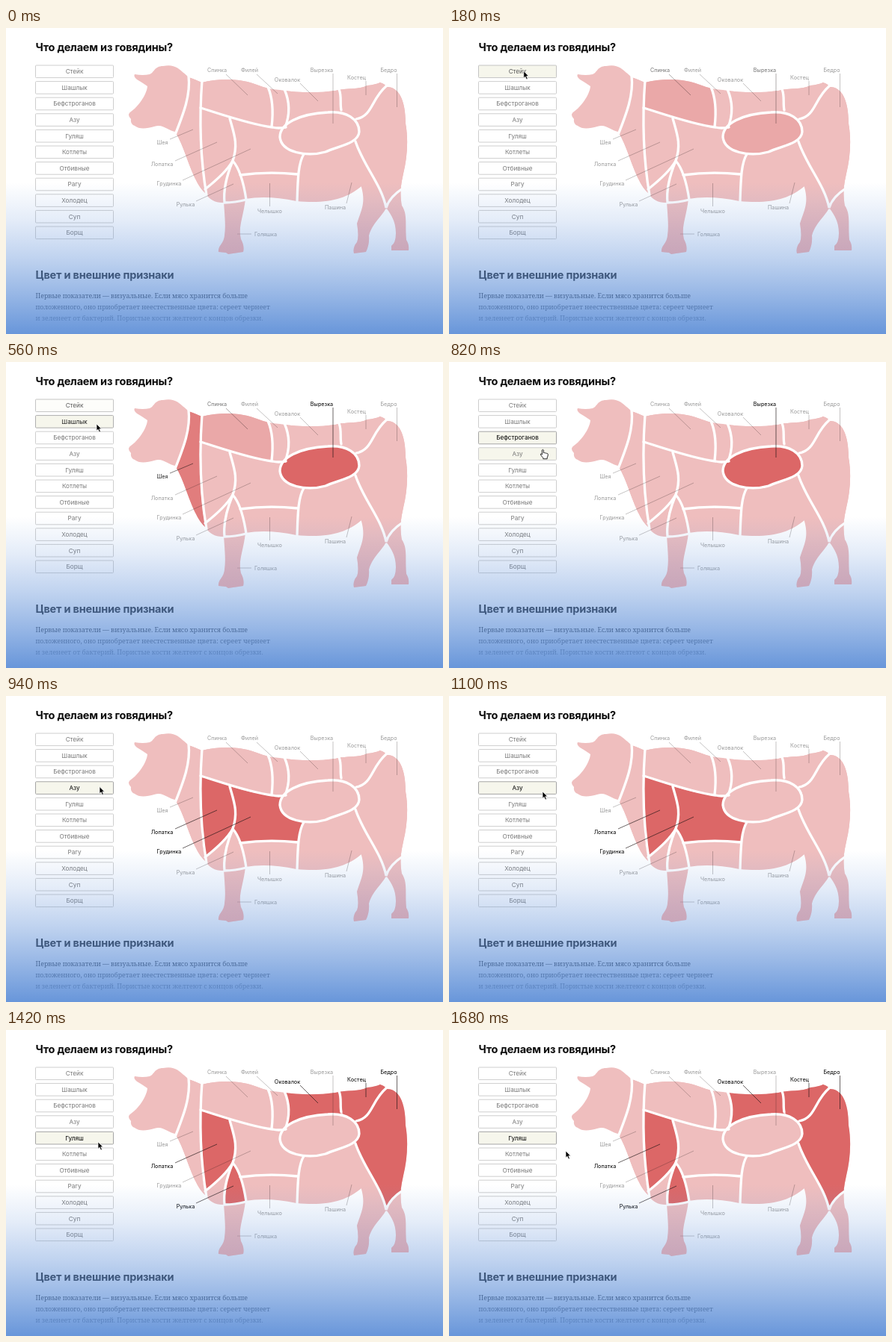
An HTML page that plays this animation: 584 px wide and 410 px high, repeating every 1.7 s.

```html
<!DOCTYPE html>
<html lang="ru">
<head>
<meta charset="utf-8">
<title>Что делаем из говядины?</title>
<style>
html, body { margin: 0; width: 100%; height: 100%; overflow: hidden; background: #fff; }
svg { display: block; width: 584px; height: 410px; }
text { font-family: Inter, "Open Sans", sans-serif; }
.head { font-size: 14.5px; font-weight: 700; letter-spacing: -.2px; fill: #0c0c0c; }
.body { font: 8.77px "Noto Serif", serif; fill: #000; }
.dish text { font-size: 8.2px; text-anchor: middle; }
.label { font-size: 7.25px; text-anchor: middle; }
.seams { fill: none; stroke: #fff; stroke-width: 3.3; stroke-linecap: round; }
</style>
</head>
<body>
<svg viewBox="0 0 584 410">
  <defs>
    <clipPath id="cow">
      <path d="M244,66 Q253,69 262,73 C285,67 315,67 338,77 Q350,82 366,83 Q405,89 440,84 C455,80 472,83 483,77 Q493,76 500,73 Q507,75 508,79 C524,78 534,95 534,128 C538,150 536,175 531,195 Q528,208 527,220 L508,243 Q492,225 475,212 C455,229 430,236 388,232 Q350,224 320,229 L291,234 Q275,235 266,221 C247,203 241,162 226,139 C215,137 210,128 198,132 C188,135 178,136 172,131 Q166,129 167,122 Q161,116 167,112 C176,106 188,90 189,78 Q182,73 175,69 Q170,65 172,62 Q183,64 192,62 C198,60 198,51 210,51 C228,47 234,58 244,66Z"/>
      <path d="M474,210 C482,235 474,245 469,262 Q472,280 469,287 Q463,294 465,302 L481,300 Q486,290 485,278 C489,262 503,252 508,241 C515,250 521,260 521,275 Q521,288 515,292 L515,298 L538,298 Q539,290 535,284 C533,262 537,250 529,238 Q527,228 528,214Z"/>
      <path d="M291,232 C292,250 294,265 292,278 C291,290 283,291 284,300 L294,301 L297,303 L317,300 Q319,292 314,283 C310,265 317,255 320,229Z"/>
    </clipPath>
    <linearGradient id="haze" x2="0" y2="1">
      <stop stop-color="#6896da" stop-opacity="0"/>
      <stop offset=".25" stop-color="#6896da" stop-opacity=".18"/>
      <stop offset=".5" stop-color="#6896da" stop-opacity=".42"/>
      <stop offset=".75" stop-color="#6896da" stop-opacity=".7"/>
      <stop offset="1" stop-color="#6896da"/>
    </linearGradient>
    <linearGradient id="blush" x2="0" y2="1">
      <stop stop-color="#dc9ca6" stop-opacity="0"/>
      <stop offset="1" stop-color="#dc9ca6" stop-opacity=".45"/>
    </linearGradient>
  </defs>

  <text class="head" x="39.5" y="31">Что делаем из говядины?</text>
  <g id="menu"></g>

  <g clip-path="url(#cow)">
    <path fill="#efbebe" d="M150,40H560V310H150Z"/>
    <g id="cuts"></g>
  </g>
  <g class="seams">
    <path d="M244,64 C247,90 237,115 226,143"/>
    <path d="M262,70 C259,110 258,165 268,224"/>
    <path d="M260,107 C280,113 328,130 356,133 Q364,135 374,133"/>
    <path d="M350,79 C357,95 357,115 355,132"/>
    <path d="M372,82 C379,98 380,115 373,133"/>
    <path d="M445,82 C449,92 446,100 448,110"/>
    <path d="M508,78 C488,95 490,118 468,122"/>
    <path d="M467,152 C478,185 502,210 508,241 Q512,227 530,215"/>
    <path d="M398,169 C390,182 390,205 389,233"/>
    <path d="M390,196 Q350,192 313,197"/>
    <path d="M299,121 C304,140 311,155 303,178 C295,192 280,205 266,216"/>
    <path d="M303,178 C296,195 290,215 292,234 Q306,234 321,230 C318,210 312,188 303,178"/>
    <path d="M366,146 C366,128 392,115 430,113 C455,111 472,122 472,139 C471,155 444,158 427,166 C402,173 368,167 366,146Z"/>
  </g>
  <g id="labels"></g>

  <text class="head" x="39.5" y="336">Цвет и внешние признаки</text>
  <text class="body" x="39.5" y="361.5">Первые показатели — визуальные. Если мясо хранится больше</text>
  <text class="body" x="39.5" y="376.5">положенного, оно приобретает неестественные цвета: сереет чернеет</text>
  <text class="body" x="39.5" y="391.5">и зеленеет от бактерий. Пористые кости желтеют с концов обрезки.</text>
  <rect y="207" width="584" height="203" fill="url(#haze)"/>
  <g clip-path="url(#cow)"><rect x="270" y="232" width="275" height="72" fill="url(#blush)"/></g>

  <g id="cursor" stroke="#fff" stroke-width=".7" stroke-linejoin="round">
    <path id="arrow" d="M0,0V9.2L2.1,7.3L3.7,11L5.4,10.3L3.8,6.7H6.6Z"/>
    <path id="hand" fill="#fff" stroke="#111" stroke-width=".9" d="M0,.8Q1,-.5 2,.8V4.6Q3,3.8 4,4.9Q5.2,4.3 6,5.3Q7.6,4.9 7.9,6.4Q8.1,9 6.8,10.8V12.6H1.4V11.2Q-.8,9 -2,7Q-2.3,5.5 -.9,6L0,7Z"/>
  </g>
</svg>
<script>
const LOOP = 1700, STEP = 20, FADE = 80, PITCH = 21.6;

const dishes = ['Стейк', 'Шашлык', 'Бефстроганов', 'Азу', 'Гуляш', 'Котлеты',
  'Отбивные', 'Рагу', 'Холодец', 'Суп', 'Борщ'];

// name, label centre, baseline, pointer line
const labels = [
  ['Спинка', 282, 58.5, 'M294,62L323,90'],
  ['Филей', 325.5, 58.5, 'M335,62L363,88'],
  ['Оковалок', 376, 71.5, 'M393,74L417,98'],
  ['Вырезка', 422, 58.5, 'M437,61V128'],
  ['Костец', 468.5, 68.5, 'M481,71V90'],
  ['Бедро', 511.5, 58.5, 'M522.5,61V106'],
  ['Шея', 209, 156, 'M219,149L250,136'],
  ['Лопатка', 208.5, 184.5, 'M226,178L282,153'],
  ['Грудинка', 218, 210.5, 'M236,204L327,162'],
  ['Рулька', 240, 238.5, 'M254,232L304,209'],
  ['Челышко', 352.5, 248, 'M352.5,208V239'],
  ['Пашина', 440, 243, 'M455,235L462,207'],
  ['Голяшка', 347, 279, 'M309,276H328']
];

const cuts = {
  'Шея': 'M244,60 C247,90 237,115 226,143 L240,215 L268,224 C258,165 259,110 262,66Z',
  'Спинка': 'M262,70 Q260,92 260,107 C280,113 328,130 356,133 C357,115 357,95 350,76 L300,60Z',
  'Оковалок': 'M372,78 C379,98 380,115 373,133 L400,125 L448,120 V108 C446,100 449,92 445,78Z',
  'Костец': 'M445,78 C449,92 446,100 448,108 L455,122 H468 C490,118 488,95 508,78 L500,65Z',
  'Бедро': 'M508,78 C488,95 490,118 468,122 L460,140 L467,152 C478,185 502,210 508,241 Q512,227 530,215 L550,140 L530,75Z',
  'Лопатка': 'M260,107 Q282,113 299,121 C304,140 311,155 303,178 C295,192 280,205 266,216 C260,190 259,150 260,107Z',
  'Грудинка': 'M299,121 Q330,131 356,133 L374,133 L380,150 L398,169 Q391,182 390,196 Q350,192 313,197 Q308,185 303,178 C311,155 304,140 299,121Z',
  'Рулька': 'M303,178 C296,195 290,215 292,234 Q306,234 321,230 C318,210 312,188 303,178Z',
  'Вырезка': 'M366,146 C366,128 392,115 430,113 C455,111 472,122 472,139 C471,155 444,158 427,166 C402,173 368,167 366,146Z'
};

// click time, dish index, cuts it lights up
const clicks = [
  [0, -1, []],
  [160, 0, ['Спинка', 'Вырезка']],
  [500, 1, ['Шея', 'Вырезка']],
  [700, 2, ['Вырезка']],
  [840, 3, ['Лопатка', 'Грудинка']],
  [1320, 4, ['Оковалок', 'Костец', 'Бедро', 'Лопатка', 'Рулька']]
];

// time, x, y of the pointer tip
const route = [[20, 14, 14], [150, 99, 57], [340, 111, 69.5], [460, 119, 79], [560, 121, 83],
  [690, 122, 101], [840, 124.5, 118], [940, 125, 121.5], [1100, 125, 128],
  [1280, 123, 151], [1420, 123, 150], [1680, 156, 162]];

const $ = id => document.getElementById(id);

function add(parent, tag, attrs, text = '') {
  const el = document.createElementNS('http://www.w3.org/2000/svg', tag);
  for (const key in attrs) el.setAttribute(key, attrs[key]);
  el.textContent = text;
  return parent.appendChild(el);
}

const mix = (a, b, k) => `rgb(${a.map((v, i) => Math.round(v + (b[i] - v) * k))})`;
const gray = (a, b, k) => mix([a, a, a], [b, b, b], k);

const buttons = dishes.map((name, i) => {
  const g = add($('menu'), 'g', { class: 'dish', transform: `translate(39.5 ${50 + i * PITCH})` });
  return {
    box: add(g, 'rect', { width: 104, height: 16.6, rx: 1 }),
    text: add(g, 'text', { x: 52, y: 11.3 }, name)
  };
});

const marks = labels.map(([name, x, y, d]) => ({
  name,
  line: add($('labels'), 'path', { d, 'stroke-width': .8 }),
  text: add($('labels'), 'text', { class: 'label', x, y }, name)
}));

const shapes = Object.entries(cuts).map(([name, d]) => ({ name, el: add($('cuts'), 'path', { d }) }));

function pointer(t) {
  const i = Math.max(1, route.findIndex(p => p[0] >= t));
  const [t0, x0, y0] = route[i - 1], [t1, x1, y1] = route[i];
  const u = Math.max(0, (t - t0) / (t1 - t0)), k = u * u * (3 - 2 * u);
  return [x0 + (x1 - x0) * k, y0 + (y1 - y0) * k];
}

function rowAt(x, y) {
  const row = Math.floor((y - 50) / PITCH);
  return x > 39 && x < 144 && y - 50 - row * PITCH < 17 ? row : -1;
}

function draw(t) {
  const n = clicks.filter(c => c[0] <= t).length - 1;
  const now = clicks[n], before = clicks[Math.max(0, n - 1)];
  const k = Math.min(1, (t - now[0]) / FADE);
  const blend = test => test(before) * (1 - k) + test(now) * k;
  const lit = name => blend(c => c[2].includes(name));

  const [x, y] = pointer(t);
  const over = t < STEP ? -1 : rowAt(x, y);

  buttons.forEach(({ box, text }, i) => {
    const on = blend(c => c[1] === i);
    box.setAttribute('fill', mix([255, 255, 255], [246, 246, 236], i === over ? 1 : on));
    box.setAttribute('stroke', gray(206, 165, on));
    text.setAttribute('fill', gray(120, 0, on));
  });
  shapes.forEach(({ name, el }) => el.setAttribute('fill', mix([239, 190, 190], [220, 103, 103], lit(name))));
  marks.forEach(({ name, line, text }) => {
    const on = lit(name);
    text.setAttribute('fill', gray(155, 0, on));
    line.setAttribute('stroke', `rgba(30,20,20,${.32 + .5 * on})`);
  });

  const hand = over >= 0 && over !== now[1];
  $('cursor').setAttribute('transform', `translate(${x} ${y})`);
  $('cursor').style.display = t < STEP ? 'none' : '';
  $('arrow').style.display = hand ? 'none' : '';
  $('hand').style.display = hand ? '' : 'none';
}

const start = performance.now();
function tick() {
  const t = Math.max(0, performance.now() - start) % LOOP;
  draw(Math.min(LOOP - STEP, Math.floor(t / STEP) * STEP));
  requestAnimationFrame(tick);
}
tick();
</script>
</body>
</html>
```
